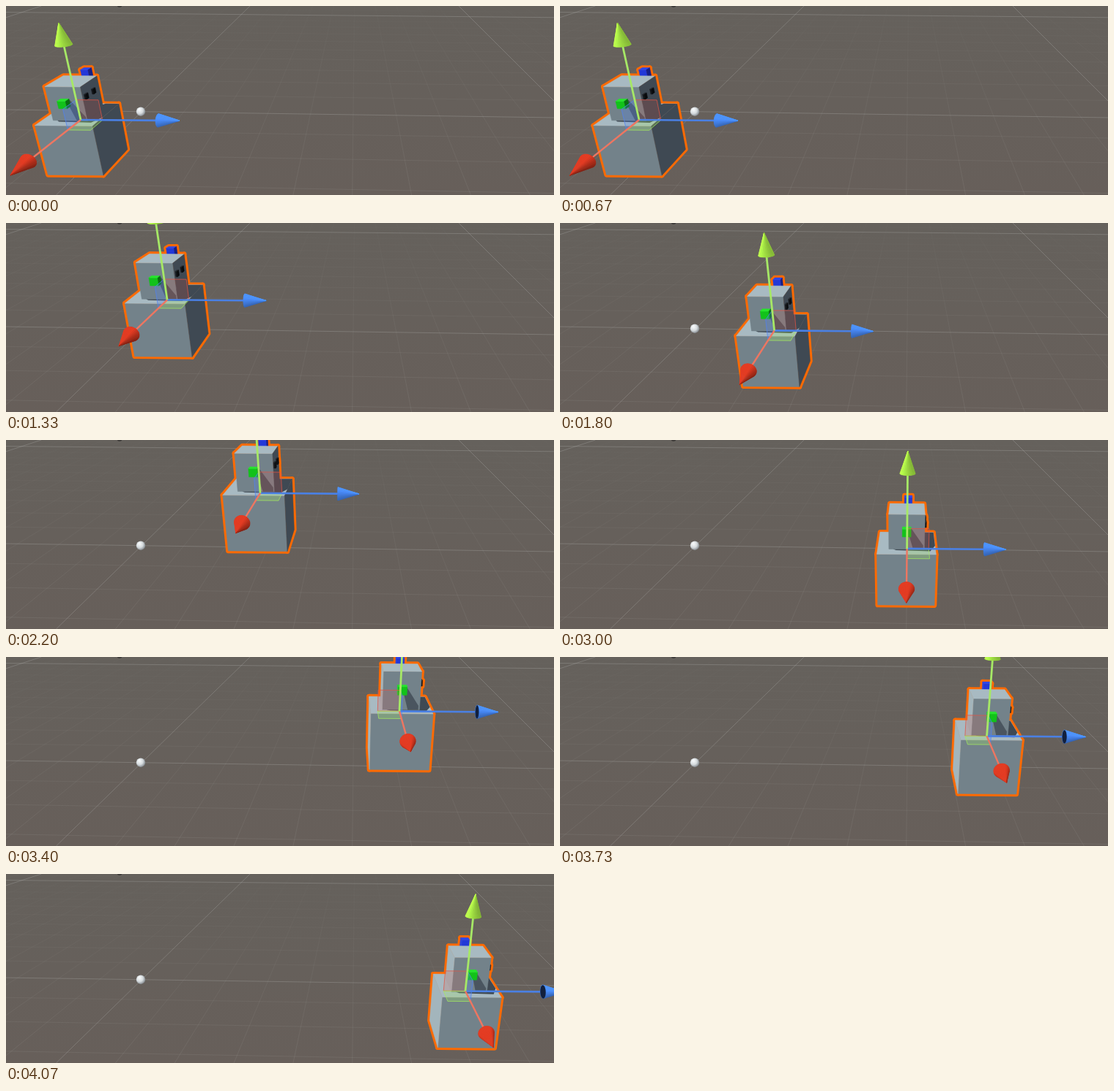
An HTML page with a canvas that plays this animation: 748 px wide and 259 px high, repeating every 4.14 s.

```html
<!DOCTYPE html>
<html lang="en">
<head>
<meta charset="utf-8">
<title>Hopping cube figure</title>
<style>
  html, body { margin: 0; width: 100%; height: 100%; overflow: hidden; background: #66605b; }
  canvas { display: block; }
</style>
</head>
<body>
<canvas id="stage" width="748" height="259"></canvas>
<script>
const ctx = document.getElementById('stage').getContext('2d');
const W = 748, H = 259, LOOP = 4140, STEP = 1000 / 15, END = 61 * STEP;

// Vanishing points of the depth (x) and vertical (y) axes
const VX = [477, -141], VY = [460, 1740];
const SLOPE = 0.0085;
const PATH = [[867, 150], [1333, 220], [1867, 303], [2200, 347], [2400, 380], [2533, 401],
  [2933, 463], [3400, 537], [4000, 619], [4067, 627]];

function pathX(t) {
  if (t < 660) return 102;
  if (t < 860) return 108;
  let i = 1;
  while (i < PATH.length - 1 && PATH[i][0] < t) i++;
  const [t0, x0] = PATH[i - 1], [t1, x1] = PATH[i];
  return x0 + (x1 - x0) * Math.min(1, (t - t0) / (t1 - t0));
}

function pivotAt(t) {
  const x = pathX(t);
  const hop = t < 860 ? 0 : 88 * Math.sin(Math.PI * (t - 467) / 1200) ** 2;
  return [x, 156 + (x - 102) * SLOPE - hop];
}

// Projects local x (to viewer), y (up), z (right) around pivot o
function projector(o, s) {
  return (x, y, z) => {
    const a = -s * x / 297, b = -s * y / 1584, w = 1 + a + b;
    return [(o[0] + a * VX[0] + b * VY[0] + s * z) / w,
            (o[1] + a * VX[1] + b * VY[1] + s * z * SLOPE) / w];
  };
}

function trace(pts) {
  ctx.beginPath();
  pts.forEach(p => ctx.lineTo(p[0], p[1]));
  ctx.closePath();
}

function fill(pts, color) {
  trace(pts);
  ctx.fillStyle = color;
  ctx.fill();
}

function line(p, q, color, width) {
  ctx.beginPath();
  ctx.moveTo(...p);
  ctx.lineTo(...q);
  ctx.strokeStyle = color;
  ctx.lineWidth = width;
  ctx.stroke();
}

function area(pts) {
  return pts.reduce((sum, p, i) => {
    const q = pts[(i + 1) % pts.length];
    return sum + p[0] * q[1] - q[0] * p[1];
  }, 0);
}

// Visible faces of a box; colors are front, top, right, left
function faces(P, [x0, x1, y0, y1, z0, z1], colors) {
  return [
    [P(x1, y1, z0), P(x1, y1, z1), P(x1, y0, z1), P(x1, y0, z0)],
    [P(x0, y1, z0), P(x0, y1, z1), P(x1, y1, z1), P(x1, y1, z0)],
    [P(x1, y1, z1), P(x0, y1, z1), P(x0, y0, z1), P(x1, y0, z1)],
    [P(x0, y1, z0), P(x1, y1, z0), P(x1, y0, z0), P(x0, y0, z0)]
  ].map((pts, i) => ({ pts, color: colors[i] })).filter(f => area(f.pts) > 0);
}

function drawScene() {
  const bg = ctx.createLinearGradient(0, 0, 0, H);
  bg.addColorStop(0, '#65615c');
  bg.addColorStop(1, '#675f5a');
  ctx.fillStyle = bg;
  ctx.fillRect(0, 0, W, H);

  const minor = ctx.createLinearGradient(0, 0, 0, H);
  minor.addColorStop(0, 'rgba(165,165,160,.02)');
  minor.addColorStop(.5, 'rgba(165,165,160,.09)');
  minor.addColorStop(1, 'rgba(165,165,160,.15)');
  const style = n => n % 10 ? minor : 'rgba(175,175,172,.32)';

  for (let n = -40; n <= 30; n++) {
    const x = 333 + 28.5 * n, k = (H - VX[1]) / -VX[1];
    line([x, 0], [VX[0] + (x - VX[0]) * k, H], style(n), 1);
  }
  for (let n = -4; n <= 11; n++) {
    const d = 1 / (.003472 + n * .0003), y = d - 146;
    line([0, y], [W, y + W * (.004 + 3.7e-5 * d)], style(n), 1);
  }

  ctx.fillStyle = '#393735';
  ctx.beginPath();
  ctx.ellipse(155, 0, 3, 1.7, 0, 0, 7);
  ctx.fill();

  const ball = ctx.createRadialGradient(182, 142, 1, 183, 144, 8);
  ball.addColorStop(0, '#f4f7f8');
  ball.addColorStop(.5, '#d5dadd');
  ball.addColorStop(1, '#70767b');
  ctx.fillStyle = ball;
  ctx.beginPath();
  ctx.arc(184, 144.7, 6.2, 0, 7);
  ctx.fill();
}

function drawFigure(o) {
  const scale = (VY[1] - o[1]) / (VY[1] - 156) * (1 + (o[0] - 370) * 5e-5);
  const P = projector(o, scale);
  const skin = ['#73828a', '#a8bac2', '#3f4953', '#a3b5bc'];
  const ink = ['#14171a', '#25292c', '#080a0c', '#14171a'];
  const body = faces(P, [-15.7, 15.7, -60, 8, -38.3, 37.2], skin);
  const hat = faces(P, [-17, -13, 46, 57, -4, 6.5], ['#2238d8', '#2b46ee', '#151f86', '#2c43dc']);
  const head = faces(P, [-9, 9, 8, 52, -23.6, 22.6], skin);
  const nose = faces(P, [9.5, 13, 27.5, 37, -6, 5], ['#12c21a', '#26e52c', '#087010', '#20d428']);
  const eyes = [-2, 6].flatMap(x => faces(P, [x - 1.3, x + 1.3, 34.5, 41, 22.6, 24.8], ink));
  const topShadow = [[10.5, -14], [11.5, 30], [4, 37.2], [-15.7, 37.2], [-15.7, 18], [9, -18]]
    .map(([x, z]) => P(x, 8, z));
  const noseShadow = [[0, 34], [5, 35], [21, 13], [21, 8], [8, 8]].map(([z, y]) => P(9, y, z));
  const seenRight = head.some(f => f.color === skin[2]);

  ctx.lineJoin = 'round';
  ctx.strokeStyle = '#ff6a00';
  ctx.lineWidth = 6.4;
  [body, hat, head, eyes].flat().forEach(f => { trace(f.pts); ctx.stroke(); });

  const paint = list => list.forEach(f => {
    fill(f.pts, f.color);
    ctx.strokeStyle = f.color;
    ctx.lineWidth = .5;
    ctx.stroke();
  });
  paint(body);
  fill(topShadow, '#3f4953');
  paint(hat);
  if (!seenRight) paint(eyes);
  paint(head);
  if (seenRight) paint(eyes);
  fill(noseShadow, '#4a555f');
  paint(nose);
}

// Each slice is lit from the upper left
function drawCone(ring, tip, rgb) {
  const shade = k => `rgb(${rgb.map(c => Math.round(c * k))})`;
  const n = ring.length;
  const mid = [0, 1].map(j => ring.reduce((sum, p) => sum + p[j], 0) / n);
  const pts = area(ring) < 0 ? ring.slice().reverse() : ring;
  fill(pts, shade(.85));
  pts.forEach((p, i) => {
    const q = pts[(i + 1) % n];
    if (area([p, q, tip]) < 0) return;
    const light = (mid[0] - p[0]) * .6 + (mid[1] - p[1]) * .8;
    const color = shade(Math.min(1.05, .92 + light * .028));
    fill([p, q, tip], color);
    ctx.strokeStyle = color;
    ctx.lineWidth = .6;
    ctx.stroke();
  });
}

function drawGizmo(o) {
  const P = projector(o, 1);
  const LX = 60.5, LY = 122.7, LZ = 135, q = .22, r = .067, k = .785;
  const side = o[0] < VX[0] ? 1 : -1;
  const x = LX * q, y = LY * q, z = LZ * q * side;

  const plane = (pts, rgb, alpha) => {
    fill(pts, `rgba(${rgb},${alpha})`);
    ctx.strokeStyle = `rgba(${rgb},.75)`;
    ctx.lineWidth = 1;
    ctx.stroke();
  };
  plane([o, P(x, 0, 0), P(x, y, 0), P(0, y, 0)], '80,130,245', .25);
  plane([o, P(0, y, 0), P(0, y, z), P(0, 0, z)], '225,85,70', .18);
  plane([o, P(x, 0, 0), P(x, 0, z), P(0, 0, z)], '165,235,95', .25);

  const ring = at => Array.from({ length: 28 }, (_, i) => {
    const a = 2 * Math.PI * i / 28;
    return at(Math.cos(a) * r, Math.sin(a) * r);
  });

  line(o, P(0, 0, LZ * k), '#4a80e4', 2.6);
  const zRing = ring((c, s) => P(LX * s, LY * c, LZ * k));
  drawCone(zRing, P(0, 0, LZ), [74, 142, 255]);
  if (side < 0) fill(zRing, '#12203d');

  line(o, P(0, LY * k, 0), '#a6e866', 2.8);
  drawCone(ring((c, s) => P(LX * s, LY * k, LZ * c * 1.1)), P(0, LY, 0), [184, 255, 76]);

  line(o, P(LX * k, 0, 0), '#ee7661', 2.4);
  drawCone(ring((c, s) => P(LX * k, LY * s, LZ * c)), P(LX, 0, 0), [218, 58, 34]);
}

function frame(now) {
  const t = Math.min(END, Math.floor((now % LOOP + 5) / STEP) * STEP);
  const o = pivotAt(t);
  drawScene();
  drawFigure(o);
  drawGizmo(o);
  requestAnimationFrame(frame);
}
frame(performance.now());
</script>
</body>
</html>
```
